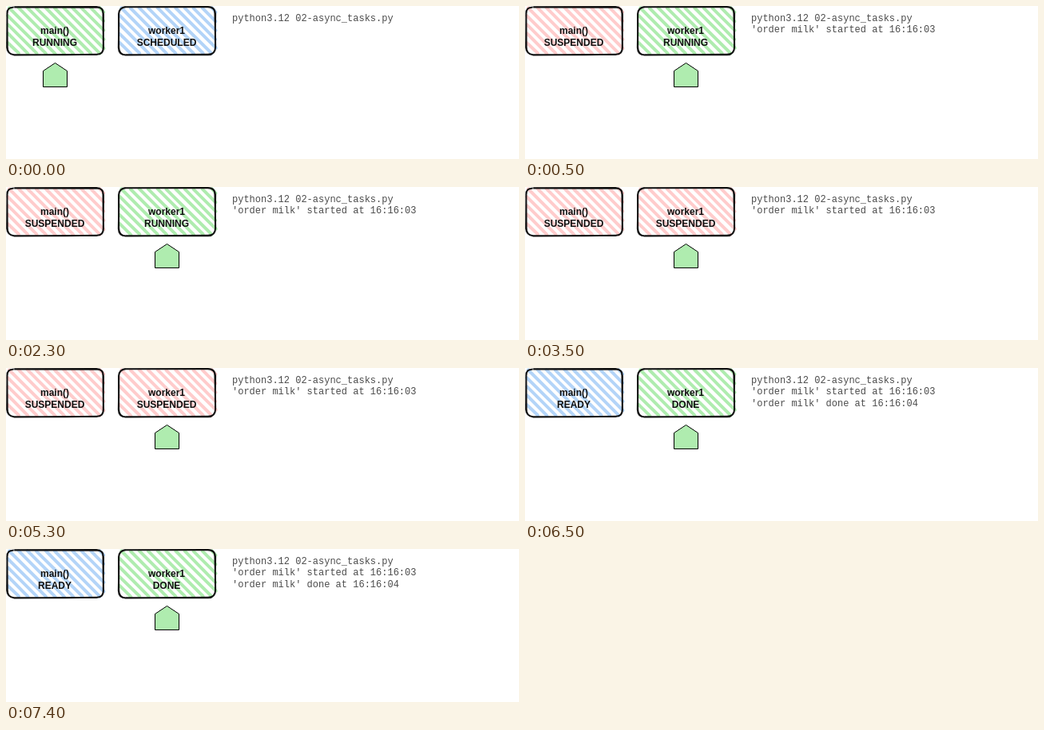
Write an HTML page that moves like this. It is 642 px wide and 192 px high and loops after 8000 ms.

```html
<!DOCTYPE html>
<html lang="en">
<head>
<meta charset="utf-8">
<title>Async task states</title>
<style>
  html, body { margin: 0; width: 100%; height: 100%; overflow: hidden; background: #fff; }
  svg { display: block; width: 642px; height: 192px; }
  .hatch { fill: none; stroke-width: 4; stroke-linecap: round; }
  .edge { fill: none; stroke: #111; stroke-width: 2; stroke-linejoin: round; }
  .label { font: bold 12px "Liberation Sans", Arial, sans-serif; text-anchor: middle; fill: #111; }
  .log { font: 12px "Liberation Mono", "Courier New", monospace; fill: #4c4c4c; white-space: pre; }
</style>
</head>
<body>
<svg viewBox="0 0 642 192">
  <g id="boxes"></g>
  <path id="pointer" d="M46.5 101.5V81.5L61.5 71.5L76.5 81.5V101.5Z" fill="#afecaf" stroke="#000"/>
  <g id="log" class="log"></g>
</svg>
<script>
const GREEN = '#afecaf', PINK = '#ffcccc', BLUE = '#b3d4f8';
const COLORS = { RUNNING: GREEN, DONE: GREEN, SUSPENDED: PINK, SCHEDULED: BLUE, READY: BLUE };
const LOOP = 8000;
const STEPS = [
  { at: 0, states: ['RUNNING', 'SCHEDULED'], pointer: 0, lines: 1 },
  { at: 500, states: ['SUSPENDED', 'RUNNING'], pointer: 140, lines: 2 },
  { at: 3500, states: ['SUSPENDED', 'SUSPENDED'], pointer: 140, lines: 2 },
  { at: 6500, states: ['READY', 'DONE'], pointer: 140, lines: 3 },
];
const LOG = [
  'python3.12 02-async_tasks.py',
  "'order milk' started at 16:16:03",
  "'order milk' done at 16:16:04",
];

function add(parent, tag, attrs, text = '') {
  const el = document.createElementNS('http://www.w3.org/2000/svg', tag);
  for (const key in attrs) el.setAttribute(key, attrs[key]);
  el.textContent = text;
  return parent.appendChild(el);
}

function seeded(seed) {
  return () => (seed = (seed * 16807) % 2147483647) / 2147483647 - 0.5;
}

// Diagonal strokes x - y = c, slightly uneven and overshooting the right side.
function hatchPath(rand) {
  let d = '';
  for (let c = -43.4; c < 116; c += 11.3) {
    const top = Math.max(2.5, 2.5 - c), bottom = Math.min(59.5, 122.5 - c);
    const j = () => rand() * 0.8;
    d += `M${top + c + j()} ${top + j()}L${bottom + c + j()} ${bottom + j()}`;
  }
  return d;
}

// Two loose passes around a rounded rectangle.
function edgePath(rand) {
  let d = '';
  for (let pass = 0; pass < 2; pass++) {
    const p = (x, y) => `${x + rand()} ${y + rand()} `;
    d += `M${p(10, 1.5)}Q${p(60, 1.5)}${p(113, 1.5)}Q${p(121.8, 1.5)}${p(121.8, 10)}`
       + `Q${p(121.8, 30)}${p(121.8, 52)}Q${p(121.8, 61)}${p(113, 61)}`
       + `Q${p(60, 61)}${p(10, 61)}Q${p(1.3, 61)}${p(1.3, 52)}`
       + `Q${p(1.3, 30)}${p(1.3, 10)}Q${p(1.3, 1.5)}${p(10, 1.5)}`;
  }
  return d;
}

const boxes = ['main()', 'worker1'].map((name, i) => {
  const rand = seeded(4217 + i * 911);
  const g = add(document.getElementById('boxes'), 'g', { transform: `translate(${i * 140})` });
  const hatch = add(g, 'path', { class: 'hatch', d: hatchPath(rand) });
  add(g, 'path', { class: 'edge', d: edgePath(rand) });
  add(g, 'text', { class: 'label', x: 61, y: 35 }, name);
  const state = add(g, 'text', { class: 'label', x: 61, y: 50 });
  return { hatch, state };
});
const pointer = document.getElementById('pointer');
const lines = LOG.map((text, i) =>
  add(document.getElementById('log'), 'text', { x: 283, y: 18.7 + i * 14.4 }, text));

function draw(now) {
  const t = now % LOOP;
  const step = STEPS.findLast(s => t >= s.at);
  boxes.forEach(({ hatch, state }, i) => {
    state.textContent = step.states[i];
    hatch.setAttribute('stroke', COLORS[step.states[i]]);
  });
  pointer.setAttribute('transform', `translate(${step.pointer})`);
  lines.forEach((line, i) => line.setAttribute('visibility', i < step.lines ? 'visible' : 'hidden'));
}

function tick() {
  draw(performance.now());
  requestAnimationFrame(tick);
}
tick();
</script>
</body>
</html>
```
